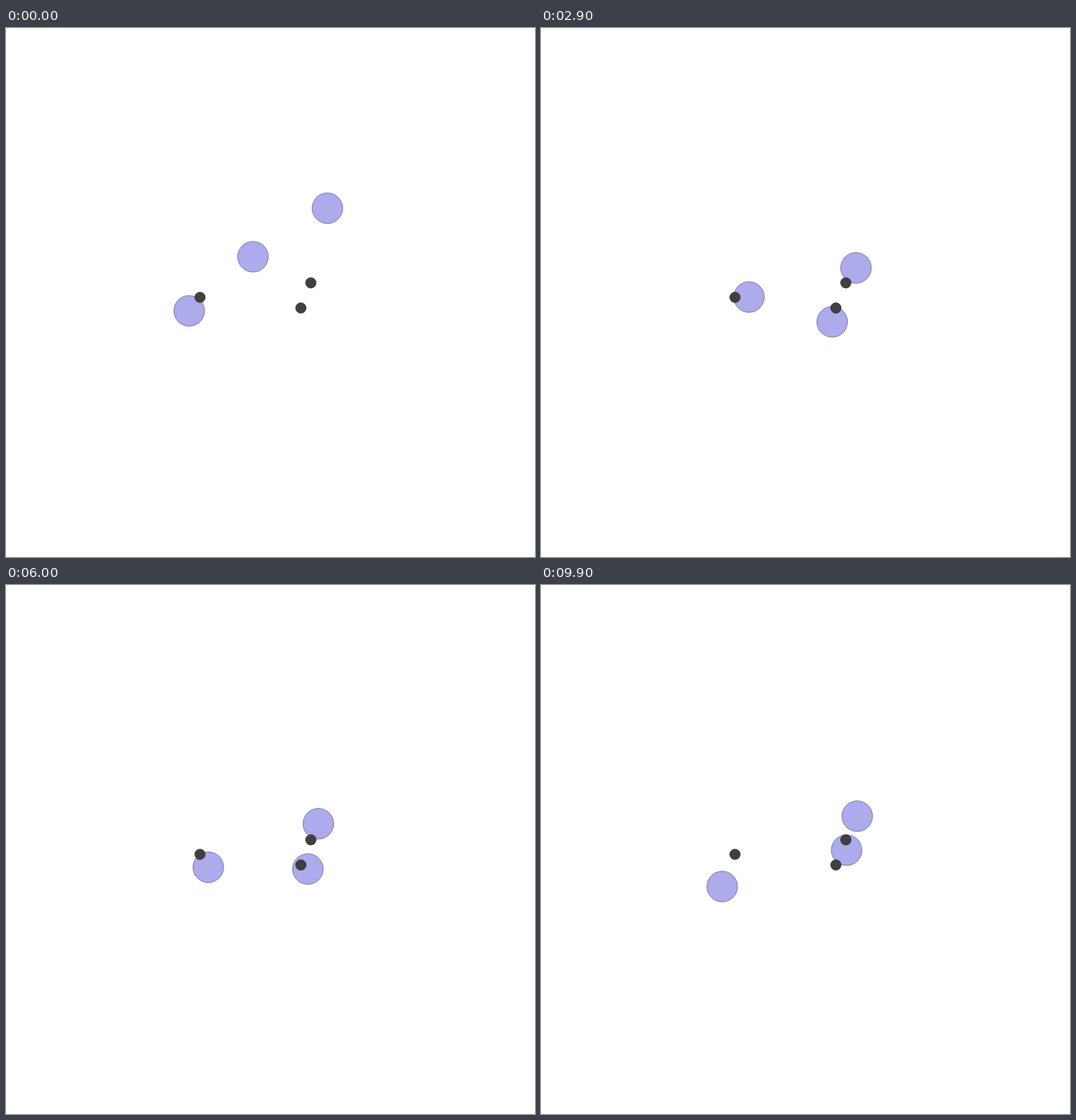
Write an HTML page with a canvas that moves like this. It is 700 px wide and 700 px high and loops after 10000 ms.

```html
<!DOCTYPE html>
<html lang="en">
<head>
<meta charset="utf-8">
<title>Agents and landmarks</title>
<style>
  html, body { margin: 0; width: 100%; height: 100%; overflow: hidden; background: #fff; }
  canvas { display: block; width: 700px; height: 700px; }
</style>
</head>
<body>
<canvas id="stage" width="700" height="700"></canvas>
<script>
const ctx = document.getElementById('stage').getContext('2d');
const LOOP = 10000, STEP = 100;

const landmarks = [[256.7, 356.4], [403.4, 337.2], [390.2, 370.5]];

// Key steps shared by all agents, and where each agent is at them
const keys = [0, 8, 14, 29, 48, 72, 85, 99];
const agents = [
  { x: [242.4, 287, 298.6, 275.2, 283.2, 247.2, 239.6, 239.8],
    y: [374.3, 435, 395.3, 356, 372.7, 373.8, 374.2, 399] },
  { x: [326.8, 372, 377.3, 385.3, 392, 404.4, 401.2, 404.4],
    y: [302.7, 381, 385.8, 388.8, 383.7, 370.2, 380.9, 350.9] },
  { x: [425.3, 462, 410.3, 416.8, 413.8, 412.9, 411.3, 418.4],
    y: [238.5, 279, 320.8, 317.4, 319, 312.8, 314.3, 305.9] }
];

// Mean of the neighbouring slopes, zero at a turning point
function velocity(values, i) {
  if (i === 0 || i === keys.length - 1) return 0;
  const slope = k => (values[k + 1] - values[k]) / (keys[k + 1] - keys[k]);
  const a = slope(i - 1), b = slope(i);
  return a * b > 0 ? 2 * a * b / (a + b) : 0;
}

function at(values, step) {
  let i = 0;
  while (i < keys.length - 2 && step >= keys[i + 1]) i++;
  const span = keys[i + 1] - keys[i];
  const u = (step - keys[i]) / span, v = 1 - u;
  return values[i] * (1 + 2 * u) * v * v + values[i + 1] * (3 - 2 * u) * u * u
    + span * u * v * (v * velocity(values, i) - u * velocity(values, i + 1));
}

function disc(x, y, r, fill, edge) {
  ctx.beginPath();
  ctx.arc(x, y, r, 0, Math.PI * 2);
  ctx.fillStyle = fill;
  ctx.fill();
  ctx.strokeStyle = edge;
  ctx.stroke();
}

function draw(now) {
  const step = Math.floor((now % LOOP) / STEP);
  ctx.fillStyle = '#fff';
  ctx.fillRect(0, 0, 700, 700);
  for (const { x, y } of agents) {
    disc(at(x, step), at(y, step), 20.3, '#adabeb', 'rgba(45, 45, 108, 0.5)');
  }
  for (const [x, y] of landmarks) disc(x, y, 7, '#404040', 'rgba(32, 32, 32, 0.5)');
}

let start;
function tick(now) {
  if (start === undefined) start = now;
  draw(Math.max(0, now - start));
  requestAnimationFrame(tick);
}
draw(0);
requestAnimationFrame(tick);
</script>
</body>
</html>
```
